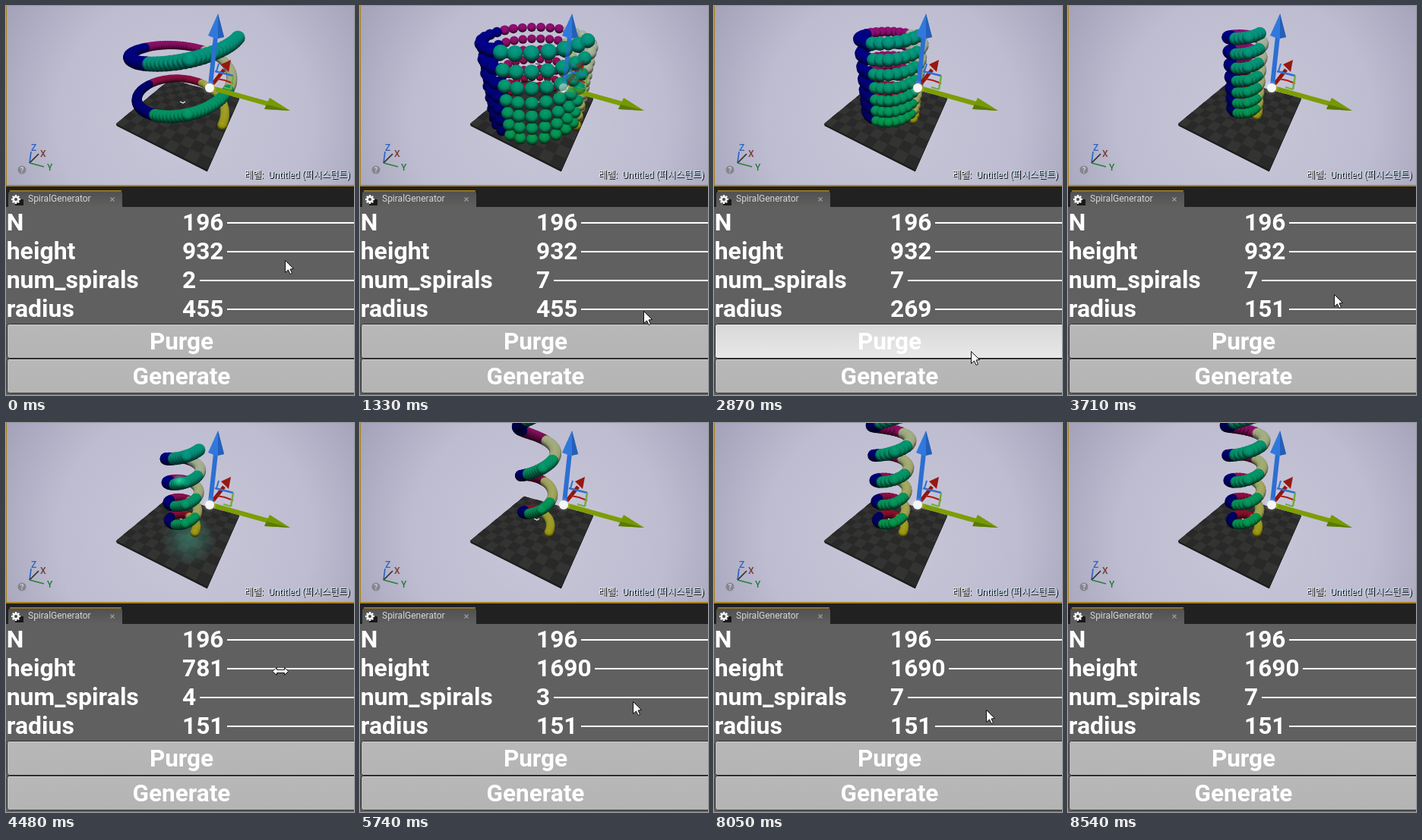
An HTML page with a canvas for the animation above (9100 ms loop, 458 by 513 pixels).

```html
<!DOCTYPE html>
<html lang="en">
<head>
<meta charset="utf-8">
<title>Spiral generator</title>
<style>
html, body { margin: 0; width: 100%; height: 100%; overflow: hidden; background: #606060; }
canvas { display: block; }
</style>
</head>
<body>
<canvas id="stage" width="458" height="513"></canvas>
<script>
const ctx = document.getElementById('stage').getContext('2d');
const LOOP = 9100, TICK = 70, LAG = 210, COUNT = 196;
const UI = 'Roboto, "Noto Sans CJK KR", "Noto Sans CJK", sans-serif';

const initial = { turns: 2, height: 932, radius: 455 };
const drag = (key, start, end, to) => ({ key, start, end, to });
const drags = [
  drag('turns', 280, 840, 7),
  drag('radius', 1470, 1610, 269),
  drag('radius', 3430, 3500, 151),
  drag('turns', 3990, 4200, 4),
  drag('height', 4400, 4480, 781),
  drag('height', 4550, 4970, 1690),
  drag('turns', 5530, 5670, 3),
  drag('turns', 6230, 6510, 1),
  drag('turns', 6580, 6790, 2),
  drag('turns', 6930, 6930, 5),
  drag('turns', 7420, 7630, 7)
];
// Pointer stops: time, x, y
const stops = [[0, 367, 335], [280, 366, 372], [1120, 366, 372], [1330, 373, 402], [1610, 390, 402],
  [1960, 330, 440], [2310, 296, 462], [2520, 296, 485], [2870, 338, 455], [3220, 348, 388],
  [3710, 350, 380], [4270, 361, 327], [4550, 361, 327], [5180, 359, 367], [7980, 359, 367], [8400, 352, 520]];

const clamp = v => Math.max(0, Math.min(1, v));
const smooth = k => k * k * (3 - 2 * k);
const mix = (a, b, k) => a + (b - a) * k;

function settings(t) {
  const state = { ...initial };
  for (const d of drags) {
    if (t < d.start) break;
    const k = d.end > d.start ? clamp((t - d.start) / (d.end - d.start)) : 1;
    state[d.key] = Math.round(mix(state[d.key], d.to, k));
  }
  return state;
}

function pointer(t) {
  if (drags.some(d => t > d.start && t < d.end)) return null;
  const i = stops.findLastIndex(s => s[0] <= t), a = stops[i], b = stops[i + 1] || a;
  const k = b === a ? 0 : smooth((t - a[0]) / (b[0] - a[0]));
  return { x: Math.round(mix(a[1], b[1], k)), y: Math.round(mix(a[2], b[2], k)) };
}

// Perspective given by the three vanishing points and the floor centre.
function project(X, Y, Z) {
  const a = X * 4.055e-4, b = Y * -2.39e-4, c = Z * -2.75e-4, w = 1 + a + b + c;
  return { x: (232.6 + 377 * a - 197 * b + 229 * c) / w, y: (137 - 36 * a - 16 * b + 452 * c) / w, w };
}

function trace(points) {
  ctx.beginPath();
  points.forEach(p => ctx.lineTo(p[0], p[1]));
}
function poly(points, fill, stroke) {
  trace(points);
  ctx.closePath();
  ctx.fillStyle = fill;
  ctx.fill();
  if (stroke) { ctx.strokeStyle = stroke; ctx.lineWidth = 1; ctx.stroke(); }
}
function line(color, width, ...points) {
  trace(points);
  ctx.strokeStyle = color;
  ctx.lineWidth = width;
  ctx.stroke();
}
function disc(x, y, r, fill) {
  ctx.beginPath();
  ctx.arc(x, y, r, 0, Math.PI * 2);
  ctx.fillStyle = fill;
  ctx.fill();
}
function rect(x, y, w, h, fill) {
  ctx.fillStyle = fill;
  ctx.fillRect(x, y, w, h);
}
function text(s, x, y, font, color, align = 'left') {
  ctx.font = font + ' ' + UI;
  ctx.textAlign = align;
  ctx.fillStyle = color;
  ctx.fillText(s, x, y);
}
function ramp(y0, y1, top, bottom) {
  const g = ctx.createLinearGradient(0, y0, 0, y1);
  g.addColorStop(0, top);
  g.addColorStop(1, bottom);
  return g;
}
function glow(x, y, r, rgb, alpha) {
  const g = ctx.createRadialGradient(x, y, 0, x, y, r);
  g.addColorStop(0, `rgba(${rgb},${alpha})`);
  g.addColorStop(1, `rgba(${rgb},0)`);
  disc(x, y, r, g);
}

function backdrop() {
  const g = ctx.createRadialGradient(235, 150, 20, 235, 150, 290);
  g.addColorStop(0, '#c7c6d8');
  g.addColorStop(0.55, '#bdbcd0');
  g.addColorStop(1, '#a09fb6');
  rect(0, 0, 458, 237, g);
}

function tile(x0, y0, x1, y1, z, fill) {
  const corners = [[x0, y0], [x1, y0], [x1, y1], [x0, y1]];
  poly(corners.map(([x, y]) => { const p = project(x, y, z); return [p.x, p.y]; }), fill);
}
function floor() {
  for (let z = -30; z < 0; z += 5) tile(-500, -500, 500, 500, z, '#1d1d1d');
  tile(-500, -500, 500, 500, 0, '#333332');
  for (let x = -500; x < 500; x += 100)
    for (let y = -500; y < 500; y += 100)
      if ((x + y) % 200) tile(x, y, x + 100, y + 100, 0, '#292929');
}

function mark(x, y) {
  line('#333', 1, [x - 3, y + 2], [x + 3, y + 3]);
  line('#eee', 1.3, [x - 4, y - 2], [x, y], [x + 3, y - 2]);
}

// Red and green follow the quadrant, blue grows along the spiral.
function balls({ turns, height, radius }) {
  const list = [];
  for (let i = 0; i < COUNT; i++) {
    const k = i / COUNT, angle = k * turns * Math.PI * 2, quarter = Math.floor(k * turns * 4 + 1e-9) % 4;
    const p = project(radius * 1.04 * Math.sin(angle), radius * Math.cos(angle), height * k - 20);
    if (p.w < 0.1) continue;
    const root = Math.sqrt(k);
    p.rgb = [
      [30 + 140 * root + 130 * (1 - root), 155 + 30 * root, 20 + 150 * root],
      [145, 15, 25 + 95 * root],
      [2, 2, 80 + 60 * root],
      [5, 152, 55 + 75 * root]
    ][quarter];
    p.front = quarter === 3;
    list.push(p);
  }
  return list.sort((a, b) => b.w - a.w);
}
function ball(p) {
  const r = 5.9 / p.w, top = p.y - r * 0.45;
  const tone = m => `rgb(${p.rgb.map(v => Math.min(255, Math.round(v * m))).join()})`;
  const g = ctx.createRadialGradient(p.x, top, 0, p.x, top, r * 1.45);
  g.addColorStop(0, tone(1.05));
  g.addColorStop(0.55, tone(0.9));
  g.addColorStop(1, tone(0.2));
  disc(p.x, p.y, r, g);
}

function gizmo() {
  line('#8f1510', 5, [272, 103], [287, 84]);
  poly([[296, 71], [283, 77], [293, 87]], '#98180f');
  line('#b01c12', 2, [278, 96], [288, 98], [299, 102]);
  line('#2f6fd0', 2.5, [275, 86], [299, 92]);
  line('#2f6fd0', 2, [277, 86], [280, 76]);
  line('#6fae3c', 2.5, [299, 92], [296, 110]);
  line('#6fae3c', 2, [286, 107], [296, 110]);
  line('#7d9d05', 6, [270, 108], [345, 129]);
  poly([[374, 138], [347, 121], [340, 136]], '#769804');
  poly([[374, 138], [343, 130], [340, 136]], '#5c7a02');
  line('#2c6fd2', 6, [269, 104], [276, 40]);
  poly([[279, 10], [266, 39], [276, 43], [287, 41]], '#3178dd');
  poly([[279, 10], [279, 43], [287, 41]], '#245fb8');
  glow(268, 108, 10, '255,255,255', 0.5);
  disc(268, 108, 6, '#f6f6f6');
}

function overlay() {
  line('#2e62c4', 1.7, [31, 207], [33, 192]);
  line('#33302f', 1.7, [31, 207], [43, 195]);
  line('#2c7d3a', 1.7, [31, 207], [50, 212]);
  text('Z', 33, 191, '500 12px', '#2e62c4');
  text('X', 45, 199, '500 12px', '#7a3a35');
  text('Y', 54, 217, '500 12px', '#237a35');
  disc(21, 216, 5.5, '#85858f');
  text('?', 21, 220, 'bold 10px', '#c9c9d4', 'center');
  ctx.shadowColor = '#000';
  ctx.shadowOffsetX = ctx.shadowOffsetY = 1;
  text('레벨:', 314, 227, '12px', '#f2f2f2');
  text('Untitled (퍼시스턴트)', 453, 227, '12px', '#cfe9f2', 'right');
  ctx.shadowColor = 'transparent';
}

function viewport(t, heightDrag) {
  const state = settings(t - LAG);
  const shown = t < 2100 || t >= 2590;
  const list = shown ? balls(state) : [];
  ctx.save();
  ctx.beginPath();
  ctx.rect(0, 0, 458, 237);
  ctx.clip();
  backdrop();
  floor();
  if (heightDrag) glow(241, 152, 36, '70,175,145', 0.5);
  mark(219, 70);
  mark(234, 74);
  mark(233, 128);
  list.forEach(ball);
  if (heightDrag) glow(228, 76, 9, '40,235,160', 0.8);
  gizmo();
  // A wide, dense spiral veils the gizmo.
  if (state.radius > 400 && state.turns > 3) {
    ctx.globalAlpha = 0.5;
    list.filter(p => p.front && p.x > 255 && p.y > 45).forEach(ball);
    ctx.globalAlpha = 1;
  }
  overlay();
  ctx.restore();
  rect(0, 0, 1, 237, '#a8811c');
}

function tab() {
  rect(0, 237, 458, 28, '#212121');
  rect(0, 236, 458, 2, '#a8811c');
  ctx.beginPath();
  ctx.roundRect(3, 244, 150, 21, [4, 4, 0, 0]);
  ctx.fillStyle = ramp(244, 265, '#505050', '#606060');
  ctx.fill();
  rect(5, 243, 147, 1.5, '#a8811c');
  rect(12, 255, 11, 8, '#191919');
  for (let i = 0; i < 4; i++) {
    const a = i * Math.PI / 4, x = Math.cos(a) * 6, y = Math.sin(a) * 6;
    line('#f2f2f2', 2.4, [13 - x, 255 - y], [13 + x, 255 + y]);
  }
  disc(13, 255, 4.5, '#f2f2f2');
  disc(13, 255, 2, '#4b4b4b');
  text('SpiralGenerator', 29, 258, '12px', '#d6d6d6');
  line('#9a9a9a', 1.2, [137.5, 252.5], [142.5, 257.5]);
  line('#9a9a9a', 1.2, [142.5, 252.5], [137.5, 257.5]);
}

function button(label, y, tip) {
  const hover = tip && tip.y > y && tip.y < y + 44;
  ctx.beginPath();
  ctx.roundRect(1.5, y - 0.5, 462, 45, 3);
  ctx.fillStyle = hover ? ramp(y, y + 44, '#d8d8d8', '#e8e8e8') : ramp(y, y + 44, '#b8b8b8', '#b4b4b4');
  ctx.fill();
  ctx.strokeStyle = '#2c2c2c';
  ctx.lineWidth = 1;
  ctx.stroke();
  rect(3, y, 455, 1, 'rgba(255,255,255,0.35)');
  text(label, 231, y + 32.5, 'bold 31.5px', '#fff', 'center');
}

function form(t, tip) {
  const { turns, height, radius } = settings(t);
  rect(0, 265, 458, 248, '#606060');
  Object.entries({ N: COUNT, height, num_spirals: turns, radius }).forEach(([name, value], i) => {
    const y = 296 + i * 38;
    text(name, 0.7, y, 'bold 32px', '#fff');
    text(value, 232, y, 'bold 31.6px', '#fff');
    const x = Math.round(236.6 + ctx.measureText(value).width);
    rect(x, y - 11, 458 - x, 2, '#fff');
  });
  button('Purge', 420, tip);
  button('Generate', 466, tip);
}

function cursor(tip, wide) {
  const shape = wide
    ? [[-11, 0], [-5, -5], [-5, -2], [5, -2], [5, -5], [10, 0], [5, 5], [5, 2], [-5, 2], [-5, 5]]
    : [[0, 0], [0, 16], [4, 12.5], [6.5, 18], [9, 17], [6.5, 11.5], [11, 11]];
  poly(shape.map(([x, y]) => [tip.x + x + 0.5, tip.y + y + 0.5]), '#fff', '#111');
}

function draw(t) {
  const tip = pointer(t), heightDrag = t >= 4410 && t < 4760;
  viewport(t, heightDrag);
  tab();
  form(t, tip);
  if (tip) cursor(tip, heightDrag);
}

let shownTick = -1;
const start = performance.now();
function loop() {
  const t = Math.floor(((performance.now() - start) % LOOP) / TICK) * TICK;
  if (t !== shownTick) draw(shownTick = t);
  requestAnimationFrame(loop);
}
loop();
</script>
</body>
</html>
```
